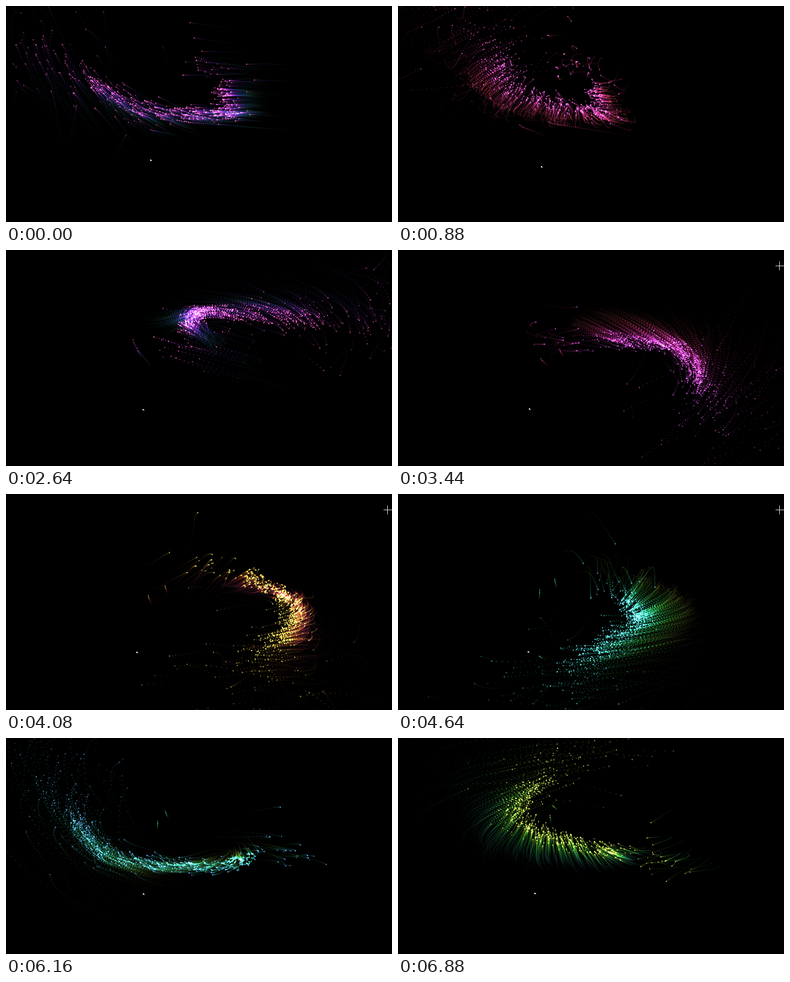
These frames come from a looping animation (640x360 px, 6960 ms). An HTML page with a canvas:

```html
<!DOCTYPE html>
<html lang="en">
<head>
<meta charset="utf-8">
<title>Particle swarm</title>
<style>
html, body { margin: 0; width: 100%; height: 100%; overflow: hidden; background: #000; }
canvas { display: block; width: 100vw; height: 100vh; }
</style>
</head>
<body>
<canvas id="stage" width="640" height="360"></canvas>
<script>
const ctx = document.getElementById('stage').getContext('2d');
const LOOP = 6960, FRAME = 80, STEP = FRAME / 3, TRAIL = 28;

// Swarm poses: time, then five points from the back of the swarm to its front
const POSES = [
  [-1000, 450,138, 450,178, 385,197, 285,212, 195,215],
  [0,     350,135, 375,180, 300,180, 215,170, 125,112],
  [440,   338,137, 374,190, 258,190, 166,165, 116,112],
  [880,   320,138, 340,180, 262,160, 190,136, 172,78],
  [1440,  310,165, 260,155, 205,122, 210,80,  300,60],
  [2000,  355,160, 300,130, 252,118, 325,92,  450,75],
  [2720,  290,125, 320,105, 360,105, 430,115, 530,130],
  [3440,  362,150, 418,158, 468,165, 491,195, 502,240],
  [4040,  400,135, 450,162, 478,190, 472,220, 440,255],
  [4640,  375,178, 390,200, 394,214, 345,242, 300,278],
  [5360,  386,186, 374,195, 330,212, 270,230, 225,243],
  [6120,  402,200, 332,215, 240,211, 150,190, 108,122],
  [6880,  360,188, 300,174, 235,158, 194,118, 255,62]
];
const HUES = [[-1000, 60], [-650, 120], [0, 320], [280, 380], [880, 310], [1400, 380],
  [2000, 510], [2840, 735], [3440, 655], [4040, 770], [4640, 905], [5360, 1070],
  [6200, 1300], [6960, 1130]];

// Slow drifters: time, head x and y, tail offset x and y
const DRIFTERS = [
  [[0, 240,206, 45,10], [880, 202,198, 50,22], [2000, 202,150, 32,45], [3440, 237,181, 15,15],
   [4640, 235,160, -1,17], [5360, 251,150, -4,15], [6880, 252,129, 2,15]],
  [[0, 288,191, 200,18], [880, 250,193, 150,26], [2000, 165,137, 20,48], [3440, 268,166, 7,12],
   [4640, 260,142, 3,16], [5360, 272,132, 2,18], [6880, 257,113, 9,8]]
];
const SPARK = [[0, 240,257], [880, 238,268], [2000, 235,267], [3440, 218,265],
  [4640, 216,263], [5360, 229,261], [6880, 227,259]];

let seed = 20417;
function rnd() {
  seed = (seed * 1664525 + 1013904223) >>> 0;
  return seed / 4294967296;
}
const gauss = () => (rnd() + rnd() + rnd() + rnd() - 2) * 1.7;
const lerp = (a, b, u) => a + (b - a) * u;

function segment(rows, t) {
  let i = 0;
  while (i < rows.length - 2 && t >= rows[i + 1][0]) i++;
  return i;
}

// Linear blend of all columns after the time
function blend(rows, t) {
  const i = segment(rows, t), a = rows[i], b = rows[i + 1];
  const u = Math.min(1, Math.max(0, (t - a[0]) / (b[0] - a[0])));
  return a.slice(1).map((v, k) => lerp(v, b[k + 1], u));
}

// Smooth curve through a track of [time, x, y]
function along(track, t) {
  const i = segment(track, t), a = track[i], b = track[i + 1];
  const before = track[Math.max(0, i - 1)], after = track[Math.min(track.length - 1, i + 2)];
  const d = b[0] - a[0], u = Math.max(0, (t - a[0]) / d);
  const u2 = u * u, u3 = u2 * u;
  const at = k => {
    const m0 = (b[k] - before[k]) / (b[0] - before[0]) * d;
    const m1 = (after[k] - a[k]) / (after[0] - a[0]) * d;
    return (2 * u3 - 3 * u2 + 1) * a[k] + (u3 - 2 * u2 + u) * m0 +
      (3 * u2 - 2 * u3) * b[k] + (u3 - u2) * m1;
  };
  return [at(1), at(2)];
}

function particle(s, spread, wander, lag, alpha) {
  const lane = Math.min(3, Math.max(0, Math.floor(s * 4)));
  const f = s * 4 - lane, ox = gauss() * spread, oy = gauss() * spread * 0.8;
  const track = POSES.map(p => {
    const k = 1 + lane * 2;
    return [p[0],
      lerp(p[k], p[k + 2], f) + ox + gauss() * wander,
      lerp(p[k + 1], p[k + 3], f) + oy + gauss() * wander * 0.8];
  });
  return { track, lag, alpha, size: 0.9 + rnd() * 0.7 };
}

const swarm = [];
for (let i = 0; i < 370; i++)
  swarm.push(particle(Math.pow(rnd(), 1.15), 8, 3, rnd() * 240 - 80, 0.55 + rnd() * 0.45));
for (let i = 0; i < 90; i++)
  swarm.push(particle(0.65 + rnd() * 0.6, 18, 8, rnd() * 300 - 80, 0.4 + rnd() * 0.35));
for (let i = 0; i < 65; i++)
  swarm.push(particle(1 + rnd() * 0.7, 55, 38, rnd() * 300 - 80, 0.2 + rnd() * 0.4));
for (let i = 0; i < 28; i++)
  swarm.push(particle(-rnd() * 0.35, 26, 9, rnd() * 300, 0.5 + rnd() * 0.4));

function dot(x, y, size) {
  ctx.fillRect(x - size / 2, y - size / 2, size, size);
}

function trailColor(t, k) {
  const hue = blend(HUES, t - k * STEP)[0] % 360;
  return `hsl(${hue}, ${k < 3 ? 95 : 75}%, ${k < 3 ? 68 : 54}%)`;
}

function drawSwarm(t) {
  for (let k = TRAIL - 1; k >= 0; k--) {
    const fade = Math.pow(1 - k / TRAIL, 1.9) * (k ? 0.62 : 1);
    ctx.fillStyle = trailColor(t, k);
    for (const p of swarm) {
      const [x, y] = along(p.track, t - p.lag - k * STEP);
      ctx.globalAlpha = fade * p.alpha;
      dot(x, y, k ? p.size : p.size + 0.6);
    }
  }
}

function drawDrifter(rows, t) {
  const [x, y, dx, dy] = blend(rows, t);
  const n = Math.round(6 + Math.hypot(dx, dy) / 4);
  for (let k = n - 1; k >= 0; k--) {
    const u = k / n;
    ctx.fillStyle = trailColor(t, u * TRAIL);
    ctx.globalAlpha = 0.9 * Math.pow(1 - u, 1.3);
    dot(x + dx * u, y + dy * Math.sqrt(u) * (0.5 + u / 2), 1.4);
  }
}

function drawPointer(t) {
  ctx.globalAlpha = 1;
  ctx.fillStyle = '#fff';
  const [x, y] = blend(SPARK, t);
  dot(x, y, 2);
  dot(x + 1.5, y + 1, 1);
  if (t >= 2960 && t < 5200) {
    ctx.fillStyle = '#c8c8c8';
    ctx.fillRect(626, 26, 14, 1);
    ctx.fillRect(632, 19, 1, 15);
  }
}

function draw(t) {
  ctx.globalCompositeOperation = 'source-over';
  ctx.globalAlpha = 1;
  ctx.fillStyle = '#000';
  ctx.fillRect(0, 0, 640, 360);
  ctx.globalCompositeOperation = 'lighter';
  drawSwarm(t);
  for (const d of DRIFTERS) drawDrifter(d, t);
  drawPointer(t);
}

let start = null, shown = -1;
function tick(now) {
  if (start === null) start = now;
  const frame = Math.floor(((now - start) % LOOP) / FRAME);
  if (frame !== shown) draw((shown = frame) * FRAME);
  requestAnimationFrame(tick);
}
requestAnimationFrame(tick);
</script>
</body>
</html>
```
